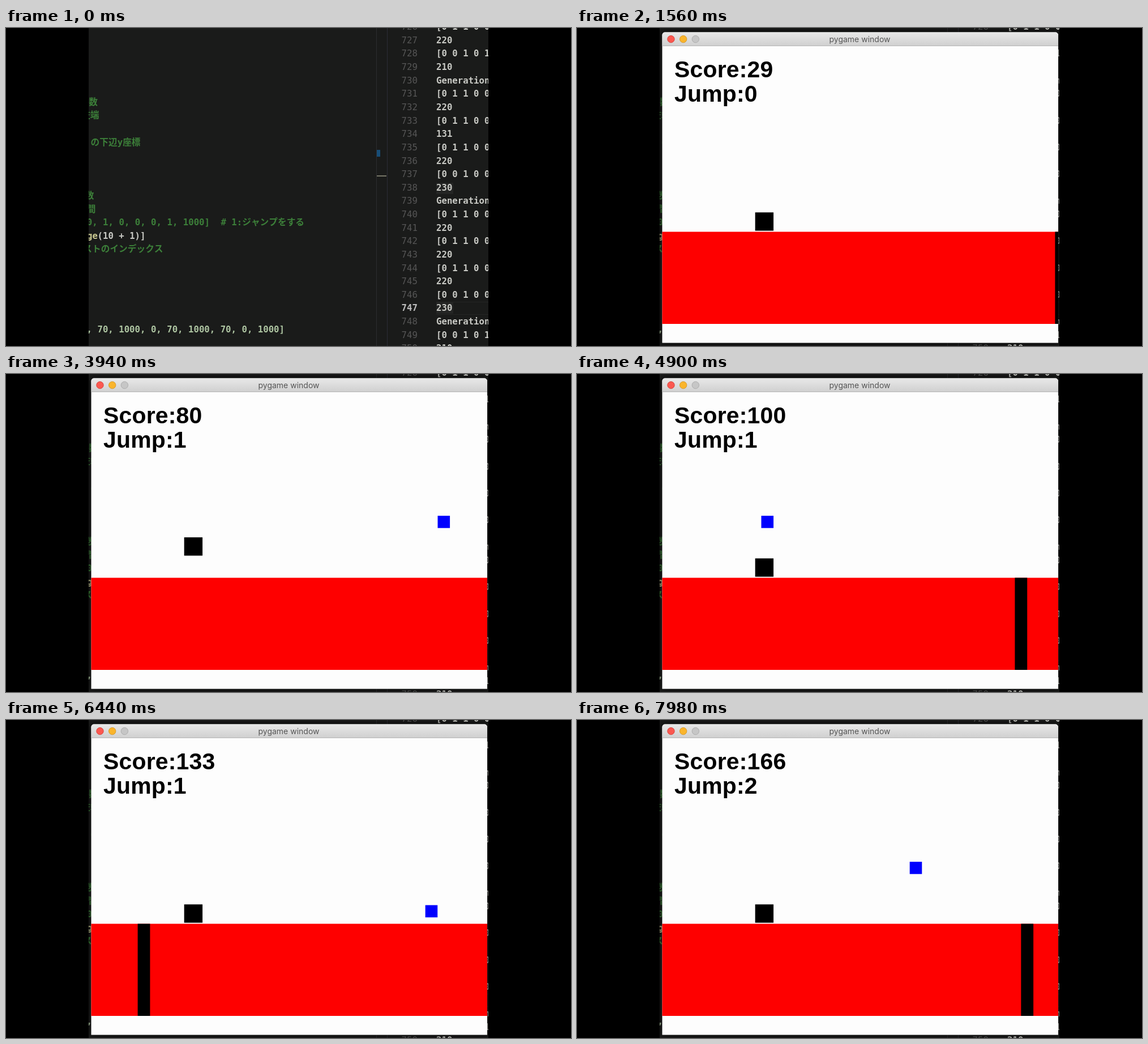
Write an HTML page with a canvas that moves like this. It is 998x561 px and loops after 8000 ms.

```html
<!DOCTYPE html>
<html lang="ja">
<head>
<meta charset="utf-8">
<title>Jump game</title>
<style>
  html, body { margin: 0; width: 100%; height: 100%; overflow: hidden; background: #000; }
  canvas { display: block; width: 100%; height: 100%; }
</style>
</head>
<body>
<canvas id="stage" width="998" height="561"></canvas>
<script>
const ctx = document.getElementById('stage').getContext('2d');
const LOOP = 8000;
const MONO = '"DejaVu Sans Mono", "Noto Sans CJK JP", "Noto Sans CJK", monospace';
const GREEN = '#3c7f39', WHITE = '#c9cac5', NUMBER = '#adc4a1';

// Game pixels to stage pixels
const SCALE = 1.0925, LEFT = 150.7;
const BALLS = [70, 1000, 0, 70, 1000, 0, 70, 1000, 70, 0, 1000];
const BALL_CYCLE = 26;
const JUMPS = [63, 141], JUMP_STEPS = 21;

function rect(color, x, y, w, h) {
  ctx.fillStyle = color;
  ctx.fillRect(x, y, w, h);
}

function text(str, x, y, color, font, align = 'left') {
  ctx.font = font;
  ctx.textAlign = align;
  ctx.fillStyle = color;
  ctx.fillText(str, x, y);
}

function code(str, x, y, color, align = 'left', weight = 'bold') {
  text(str, x, y + 5.2, color, `${weight} 15.7px ${MONO}`, align);
}

function drawLeftPane() {
  const comments = [
    ['数', 162, 131], ['左端', 164.5, 154], ['の下辺y座標', 237.5, 201.5],
    ['数', 155.5, 296], ['間', 158.5, 319.5], ['リストのインデックス', 277.5, 389.5],
    ['0, 1, 0, 0, 0, 1, 1000]', 360, 342.5], ['# 1:ジャンプをする', 527, 342.5]
  ];
  for (const [str, x, y] of comments) code(str, x, y, GREEN, 'right');
  code('ge', 162, 366.5, '#cbca92', 'right');
  code('(10 + 1)]', 246.5, 366.5, WHITE, 'right');
  code(', 70, 1000, 0, 70, 1000, 70, 0, 1000]', 492, 531.5, NUMBER, 'right');
}

function drawLog() {
  const a = '[0 1 1 0 0 1', b = '[0 0 1 0 1 1', c = '[0 0 1 0 0 1', g = 'Generation';
  const lines = [a, 220, b, 210, g, a, 220, a, 131, a, 220, c, 230,
                 g, a, 220, a, 220, a, 220, c, 230, g, b, 210];
  rect('#242524', 760, 273, 30, 20);
  rect('#242524', 760, 484, 30, 20);
  rect('#252625', 760, 483, 92, 1);
  rect('#252625', 760, 505, 92, 1);
  lines.forEach((line, i) => {
    const y = -2 + i * 23.63, current = i === 21;
    code(726 + i, 698.5, y, current ? '#bebebe' : '#565656', 'left', current ? 'bold' : 'normal');
    code(line, 760, y, WHITE);
  });
}

function drawEditor() {
  rect('#1a1b1a', 146, 0, 706, 561);
  rect('#2c2c2f', 654, 0, 1, 561);
  rect('#2c2c36', 673, 0, 1, 561);
  rect('#174e78', 655, 215, 6, 12);
  rect('#777768', 655, 260, 17, 2);
  drawLeftPane();
  drawLog();
}

function drawFrame() {
  ctx.save();
  ctx.shadowColor = 'rgba(0,0,0,.8)';
  ctx.shadowBlur = 14;
  ctx.fillStyle = '#fdfdfd';
  ctx.beginPath();
  ctx.roundRect(150.5, 7.5, 699.5, 548, [5, 5, 0, 0]);
  ctx.fill();
  ctx.restore();

  const bar = ctx.createLinearGradient(0, 8, 0, 31);
  bar.addColorStop(0, '#e8e8e8');
  bar.addColorStop(1, '#d0d0d0');
  ctx.fillStyle = bar;
  ctx.beginPath();
  ctx.roundRect(150.5, 7.5, 699.5, 24, [5, 5, 0, 0]);
  ctx.fill();
  rect('#b4b4b4', 150.5, 31, 699.5, 1);

  const lights = [['#fb5850', '#d8453e'], ['#fab52c', '#d79a2a'], ['#c6c6c6', '#adadad']];
  lights.forEach(([fill, rim], i) => {
    ctx.fillStyle = fill;
    ctx.strokeStyle = rim;
    ctx.beginPath();
    ctx.arc(166 + i * 21.7, 19.6, 6.2, 0, Math.PI * 2);
    ctx.fill();
    ctx.stroke();
  });
  text('pygame window', 499.5, 25, '#555', '14px Inter, sans-serif', 'center');
}

// Height of the player above the ground: start speed 10, gravity 1
function jumpHeight(step) {
  for (const start of JUMPS) {
    const k = step - start;
    if (k > 0 && k < JUMP_STEPS) return k * (JUMP_STEPS - k) / 2;
  }
  return 0;
}

function drawGame(step) {
  const score = Math.max(0, step);
  const jumps = JUMPS.filter(start => step > start).length;
  const font = 'bold 41px "Liberation Sans", Arial, sans-serif';

  ctx.save();
  ctx.beginPath();
  ctx.rect(150.5, 32, 699.5, 523.5);
  ctx.clip();

  rect('#fe0000', 150, 359.5, 700, 162.5);
  let hole = 1070 - 15 * score;
  while (hole < -20) hole += 1000;
  rect('#000', LEFT + hole * SCALE, 359.5, 21.8, 162.5);

  rect('#000', 314.7, 325.3 - jumpHeight(step) * SCALE, 32.4, 32.3);

  if (step > 0) {
    const height = BALLS[Math.floor((step - 1) / BALL_CYCLE)];
    const x = 580 - 20 * ((step - 1) % BALL_CYCLE);
    if (height < 1000) rect('#0000fe', LEFT + x * SCALE, 326.6 - height * SCALE, 21.6, 21.6);
  }

  ctx.letterSpacing = '0.15px';
  text('Score:' + score, 172, 86.5, '#000', font);
  text('Jump:' + jumps, 172, 130.3, '#000', font);
  ctx.restore();
}

// Steps come in threes: two short ones of 20 ms, then one of 100 ms
function stepAt(t) {
  const late = t >= 4940;
  const u = t - (late ? 140 : 120);
  const group = Math.floor(u / 140);
  const rest = u - group * 140;
  return group * 3 - 3 + Math.min(2, Math.floor(rest / 20)) + (late ? 1 : 0);
}

function draw(t) {
  const step = stepAt(t);
  rect('#000', 0, 0, 998, 561);
  ctx.save();
  ctx.beginPath();
  ctx.rect(146, 0, 706, 561);
  ctx.clip();
  drawEditor();
  if (step > -5) {
    const open = Math.min(1, (step + 7) / 6);
    ctx.globalAlpha = open;
    ctx.translate(500, 281);
    ctx.scale(0.8 + 0.2 * open, 0.8 + 0.2 * open);
    ctx.translate(-500, -281);
    drawFrame();
    drawGame(step);
  }
  ctx.restore();
}

const begin = performance.now();
function tick() {
  draw((performance.now() - begin) % LOOP);
  requestAnimationFrame(tick);
}
tick();
</script>
</body>
</html>
```
